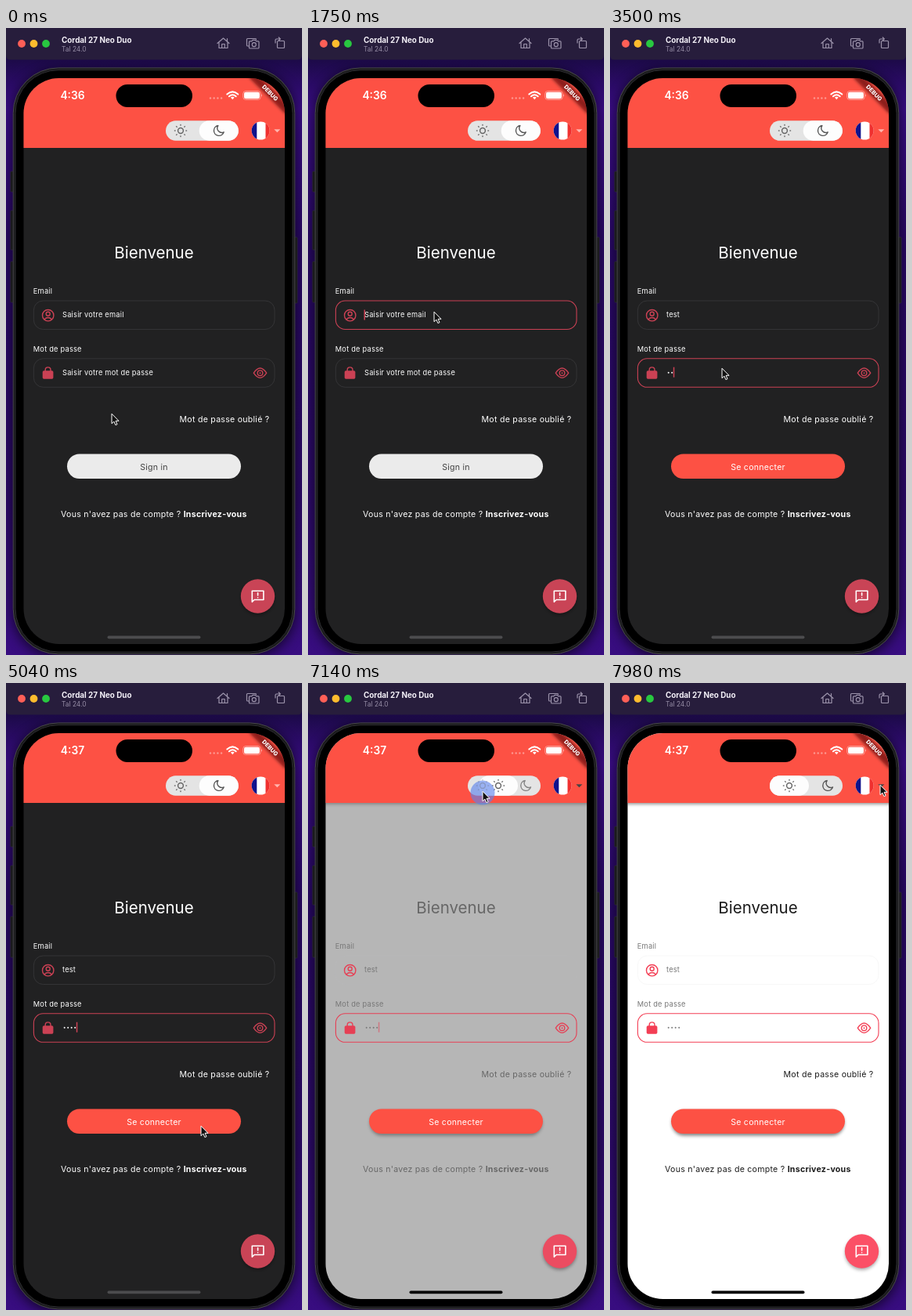
An HTML page for the animation above (8 s loop, 378 by 800 pixels).

```html
<!DOCTYPE html>
<html lang="fr">
<head>
<meta charset="utf-8">
<title>Connexion</title>
<style>
  html, body { margin: 0; width: 100%; height: 100%; overflow: hidden; background: #1b0a45; }
  svg { display: block; width: 100%; height: 100%; font-family: Inter, "Open Sans", sans-serif; }
  text { white-space: pre; }
  .small { font-size: 9.25px; letter-spacing: .22px; }
  .medium { font-size: 10.6px; letter-spacing: .25px; }
  .line { fill: none; stroke-linecap: round; stroke-linejoin: round; }
</style>
</head>
<body>
<svg viewBox="0 0 378 800">
  <defs>
    <linearGradient id="wall" x1="0" y1="0" x2="0" y2="1">
      <stop offset=".05" stop-color="#1c0a48"/>
      <stop offset=".13" stop-color="#390c84"/>
      <stop offset=".35" stop-color="#270862"/>
      <stop offset=".75" stop-color="#2c0a68"/>
      <stop offset="1" stop-color="#380d80"/>
    </linearGradient>
    <filter id="blur" x="-50%" y="-50%" width="200%" height="200%"><feGaussianBlur stdDeviation="2"/></filter>
    <filter id="wideBlur" x="-20%" y="-20%" width="140%" height="140%"><feGaussianBlur stdDeviation="8"/></filter>
    <clipPath id="screen"><rect x="22.5" y="64" width="333.5" height="722" rx="45"/></clipPath>
    <clipPath id="flag"><circle cx="325.2" cy="131" r="11.5"/></clipPath>
    <g id="sun" class="line" stroke="#666">
      <circle r="3.4" stroke-width="1.5"/>
      <circle r="7.2" stroke-width="1.9" stroke-linecap="butt" pathLength="8" stroke-dasharray=".24 .76" stroke-dashoffset=".12"/>
    </g>
    <path id="moon" class="line" stroke="#555" stroke-width="1.4" d="M-.8-6.5A6.5 6.5 0 1 0 6.5 1.8A5.7 5.7 0 0 1-.8-6.5Z"/>
  </defs>

  <rect width="378" height="800" fill="url(#wall)"/>
  <rect x="8.8" y="54" width="360.5" height="749" rx="58" opacity=".65" filter="url(#wideBlur)"/>

  <!-- Window bar -->
  <path d="M0 0H378V35Q378 40.5 372 40.5H6Q0 40.5 0 35Z" fill="#271d3c"/>
  <circle cx="20" cy="20" r="4.9" fill="#ff5f57"/>
  <circle cx="35.5" cy="20" r="4.9" fill="#febc2e"/>
  <circle cx="51" cy="20" r="4.9" fill="#28c840"/>
  <text x="71" y="18.5" font-size="9.9" font-weight="700" fill="#f4f1f8">Cordal 27 Neo Duo</text>
  <text x="71" y="30" font-size="8.4" fill="#968da6">Tal 24.0</text>
  <g class="line" stroke="#9c93ab" stroke-width="1.2">
    <path d="M270 19.500L277.500 13L285 19.500M272 18.500V25.500H283V18.500M275.700 25.500V20.500H279.300V25.500M282.500 16.500V13.500"/>
    <path d="M310 23H308.500Q307.500 23 307.500 22V14.500Q307.500 13.500 308.500 13.500H318.500Q319.500 13.500 319.500 14.500"/>
    <path d="M311.500 16.800H313.800L315 15.300H318.500L319.700 16.800H322Q323 16.800 323 17.800V25Q323 26 322 26H311.500Q310.500 26 310.500 25V17.800Q310.500 16.800 311.500 16.800Z"/>
    <circle cx="316.8" cy="21.2" r="2.5"/>
    <rect x="346.5" y="16.5" width="9" height="9" rx="1"/>
    <path d="M344 19V15.500Q344 14 345.500 14H350M348.300 12L350.300 14L348.300 16"/>
  </g>

  <!-- Phone body -->
  <g fill="#19191b" stroke="#303034" stroke-width=".6">
    <rect x="5.8" y="183" width="4" height="26" rx="1"/>
    <rect x="5.8" y="233" width="4" height="50" rx="1"/>
    <rect x="5.8" y="298" width="4" height="52" rx="1"/>
    <rect x="368" y="267" width="4" height="84" rx="1"/>
  </g>
  <rect x="9.2" y="50.9" width="359.6" height="748" rx="57.5" fill="#1a1a1c" stroke="#48484b"/>
  <rect x="12" y="53.700" width="354" height="742.400" rx="55" fill="#000" stroke="#2d2d30"/>

  <g clip-path="url(#screen)">
    <rect id="page" x="22" y="64" width="335" height="723"/>
    <rect id="barShadow" x="18" y="142" width="343" height="12.5" filter="url(#blur)"/>
    <rect x="22" y="64" width="335" height="89" fill="#fd5144"/>

    <!-- Status bar -->
    <text id="clock" x="85" y="91.3" font-size="13.8" font-weight="600" fill="#fff" text-anchor="middle"></text>
    <rect x="140.5" y="72" width="97.5" height="29" rx="14.5" fill="#000"/>
    <g fill="#fff" fill-opacity=".4">
      <circle cx="261" cy="89.5" r="1.2"/><circle cx="265.7" cy="89.5" r="1.2"/>
      <circle cx="270.4" cy="89.5" r="1.2"/><circle cx="275.1" cy="89.5" r="1.2"/>
    </g>
    <g class="line" stroke="#fff" stroke-width="2" stroke-linecap="butt">
      <path d="M282.300 84.600Q289.300 78.200 296.300 84.600M284.900 87.300Q289.300 83.300 293.700 87.300"/>
      <path d="M286.900 88.600Q289.300 86.800 291.700 88.600L289.300 91.200Z" fill="#fff" stroke="none"/>
    </g>
    <rect x="302.7" y="80.5" width="22.5" height="11" rx="3.5" fill="none" stroke="#fff" stroke-opacity=".5" stroke-width=".8"/>
    <rect x="304" y="81.8" width="19.9" height="8.4" rx="2.3" fill="#fff"/>
    <path d="M326.200 84.300Q328 86 326.200 87.700Z" fill="#fff" fill-opacity=".6"/>

    <!-- Theme switch and language -->
    <rect x="204" y="118.3" width="93" height="25.4" rx="12.7" fill="#e4e4e4"/>
    <use id="trackMoon" href="#moon" x="278" y="131"/>
    <g id="thumb">
      <rect x="-25" y="118.3" width="50" height="25.4" rx="12.7" fill="#fdfdfd"/>
      <use id="thumbSun" href="#sun" y="131"/>
      <use id="thumbMoon" href="#moon" y="131"/>
    </g>
    <circle id="ripple" cx="223" fill="#5c83ee"/>
    <use id="trackSun" href="#sun" x="223" y="131"/>
    <g clip-path="url(#flag)">
      <rect x="313" y="119" width="25" height="24" fill="#fff"/>
      <rect x="313" y="119" width="7.3" height="24" fill="#10128c"/>
      <rect x="331.5" y="119" width="7" height="24" fill="#f0302f"/>
    </g>
    <path id="arrow" d="M342.300 129.300H350.300L346.300 133.300Z"/>

    <!-- Corner ribbon -->
    <g transform="translate(356 64) rotate(45)">
      <rect x="-34" y="21.8" width="68" height="9.3" opacity=".6" filter="url(#blur)"/>
      <rect x="-34" y="21.8" width="68" height="9.3" fill="#b71c1c" fill-opacity=".45"/>
      <text y="29.1" font-size="7.3" font-weight="800" fill="#fff" text-anchor="middle">DEBUG</text>
    </g>

    <!-- Form -->
    <text class="ink" x="189" y="294.3" font-size="20.5" text-anchor="middle">Bienvenue</text>
    <text class="label small" x="34.8" y="339.3">Email</text>
    <text class="label small" x="34.8" y="412.8">Mot de passe</text>
    <rect id="emailBox" x="35.4" y="348" width="307.6" height="36.5" rx="12" fill="none"/>
    <rect id="passBox" x="35.4" y="421.8" width="307.6" height="36.5" rx="12" fill="none"/>
    <text id="email" class="label small" x="72" y="369.2"></text>
    <text id="passHint" class="label small" x="72" y="442.7">Saisir votre mot de passe</text>
    <g id="dots" class="label"></g>
    <rect id="caret" width="1.5" height="13"/>

    <g class="accentLine line" stroke-width="1.4">
      <circle cx="53.7" cy="366.7" r="7.2"/>
      <circle cx="53.7" cy="364.7" r="2.5"/>
      <path d="M48.900 371.800Q53.700 367.300 58.500 371.800"/>
      <path d="M50.200 438V436.300A3.400 3.400 0 0 1 57 436.300V438"/>
      <path d="M316.300 440.200Q324.500 427.800 332.700 440.200Q324.500 452.600 316.300 440.200Z"/>
      <circle cx="324.5" cy="440.2" r="3.3"/>
    </g>
    <rect class="accent" x="46.7" y="437.3" width="13.7" height="10.5" rx="1.7"/>
    <circle class="accent" cx="324.5" cy="440.2" r="1"/>

    <text class="ink medium" x="336.5" y="503" text-anchor="end">Mot de passe oublié ?</text>
    <rect id="buttonShadow" x="79" y="546" width="220" height="31.5" rx="15.7" filter="url(#blur)"/>
    <rect id="button" x="78" y="543.5" width="222" height="31.5" rx="15.75"/>
    <text id="buttonText" class="medium" x="189" y="563.5" text-anchor="middle"></text>
    <text class="ink medium" x="188.8" y="624" text-anchor="middle">Vous n'avez pas de compte ? <tspan font-weight="700">Inscrivez-vous</tspan></text>

    <!-- Feedback button -->
    <circle cx="321.5" cy="727.5" r="21.3" fill-opacity=".35" filter="url(#blur)"/>
    <circle id="fab" cx="321.5" cy="725" r="21.7"/>
    <g class="line" stroke="#fff" stroke-width="1.6">
      <path d="M314.300 732.300V718.300H328.900V729.500H317.100Z"/>
      <path d="M321.600 720.700V724M321.600 726.700V726.800"/>
    </g>
    <rect id="home" x="129.5" y="775.6" width="119" height="3.6" rx="1.8"/>
  </g>

  <path id="pointer" d="M0-.8V11.700L2.900 9.100L4.900 13.600L7 12.700L5.100 8.300H9Z" fill="#111" stroke="#fff" stroke-linejoin="round"/>
</svg>

<script>
const LOOP = 8000;
const $ = id => document.getElementById(id);
const clamp = v => Math.max(0, Math.min(1, v));
const ramp = (t, from, to) => clamp((t - from) / (to - from));
const ease = u => u * u * (3 - 2 * u);
const set = (el, attrs) => { for (const k in attrs) el.setAttribute(k, attrs[k]); };
const setAll = (cls, attrs) => document.querySelectorAll('.' + cls).forEach(el => set(el, attrs));

const DARK  = { page: [33, 33, 34], ink: [255, 255, 255], accent: [203, 65, 84], border: [55, 55, 57], fab: [201, 68, 86] };
const LIGHT = { page: [255, 255, 255], ink: [28, 28, 28], accent: [243, 62, 84], border: [246, 246, 246], fab: [251, 80, 102] };
const mix = (key, p) => `rgb(${DARK[key].map((d, i) => Math.round(d + (LIGHT[key][i] - d) * p))})`;

// time, x, y of the pointer tip
const PATH = [
  [0, 135, 493], [350, 135, 493], [1150, 161, 363], [2650, 161, 363], [3050, 143, 435],
  [3950, 143, 435], [4750, 249, 566], [5500, 249, 566], [6650, 223, 139], [7300, 223, 139], [7900, 345, 131]
];
const EMAIL_FOCUS = 1400, PASS_FOCUS = 3080, THEME_TAP = 7000;
const EMAIL_KEYS = [2080, 2220, 2380, 2520];
const PASS_KEYS = [3290, 3430, 3640, 3800];
const typed = (keys, t) => keys.filter(k => t >= k).length;

function pointerAt(t) {
  const i = PATH.findIndex(k => k[0] > t);
  if (i < 0) return PATH[PATH.length - 1].slice(1);
  const [a, b] = [PATH[i - 1], PATH[i]];
  const u = ease(ramp(t, a[0], b[0]));
  return [1, 2].map(j => a[j] + (b[j] - a[j]) * u);
}

function caretOpacity(t) {
  if (t < EMAIL_FOCUS) return 0;
  if (t < 4000) return 1;
  const phase = (t - 3900) % 1070;
  return ramp(phase, 0, 60) * (1 - ramp(phase, 480, 560));
}

const dots = PASS_KEYS.map((_, i) => {
  const dot = document.createElementNS('http://www.w3.org/2000/svg', 'circle');
  set(dot, { cx: 74.7 + 4.5 * i, cy: 439.8, r: 1 });
  return $('dots').appendChild(dot);
});

function drawTheme(t) {
  const p = ramp(t, THEME_TAP, THEME_TAP + 210);
  const light = p > 0.25;
  const accent = mix('accent', p);
  set($('page'), { fill: mix('page', p) });
  setAll('ink', { fill: mix('ink', p) });
  setAll('label', { fill: light ? '#777' : '#fff' });
  setAll('accent', { fill: accent });
  setAll('accentLine', { stroke: accent });
  set($('caret'), { fill: accent });
  set($('fab'), { fill: mix('fab', p) });
  set($('home'), { fill: light ? '#000' : '#4c4c4e' });
  set($('arrow'), { fill: light ? '#444' : '#ffb5ae' });
  set($('barShadow'), { opacity: 0.45 * p });
  set($('buttonShadow'), { opacity: 0.5 * p });

  const field = (id, focused) => set($(id), {
    stroke: focused ? accent : mix('border', p), 'stroke-width': focused ? 1.1 : 0.9
  });
  field('emailBox', t >= EMAIL_FOCUS && t < PASS_FOCUS);
  field('passBox', t >= PASS_FOCUS);

  const tapped = t >= THEME_TAP - 40;
  set($('thumb'), { transform: `translate(${271.7 - 42.7 * p} 0)` });
  set($('thumbSun'), { opacity: +tapped });
  set($('thumbMoon'), { opacity: +!tapped });
  set($('trackSun'), { opacity: 1 - p });
  set($('trackMoon'), { opacity: p });
  const spread = ramp(t, THEME_TAP, THEME_TAP + 140);
  set($('ripple'), {
    cy: 136 + 4 * spread, r: 10 + 5.5 * spread,
    opacity: ramp(t, THEME_TAP - 70, THEME_TAP) * (0.5 + 0.12 * spread) * (1 - ramp(t, THEME_TAP + 150, THEME_TAP + 350))
  });
}

function drawForm(t) {
  const letters = typed(EMAIL_KEYS, t), count = typed(PASS_KEYS, t);
  const email = $('email'), inEmail = t < PASS_FOCUS;
  email.textContent = letters ? 'test'.slice(0, letters) : 'Saisir votre email';
  set($('passHint'), { opacity: +!count });
  dots.forEach((dot, i) => set(dot, { opacity: +(i < count) }));

  const emailEnd = letters ? email.getComputedTextLength() : 0;
  set($('caret'), {
    x: inEmail ? 71.5 + emailEnd : 71.8 + 4.5 * count,
    y: inEmail ? 359.5 : 432.7,
    opacity: caretOpacity(t)
  });
  set($('button'), { fill: count ? '#fd5144' : '#ebebeb' });
  set($('buttonText'), { fill: count ? '#fff' : '#424242' });
  $('buttonText').textContent = count ? 'Se connecter' : 'Sign in';
  $('clock').textContent = t < 4300 ? '4:36' : '4:37';
}

function draw(now) {
  const t = now % LOOP;
  drawTheme(t);
  drawForm(t);
  set($('pointer'), { transform: `translate(${pointerAt(t)})` });
}

const start = performance.now();
function tick() {
  draw(performance.now() - start);
  requestAnimationFrame(tick);
}
tick();
</script>
</body>
</html>
```
